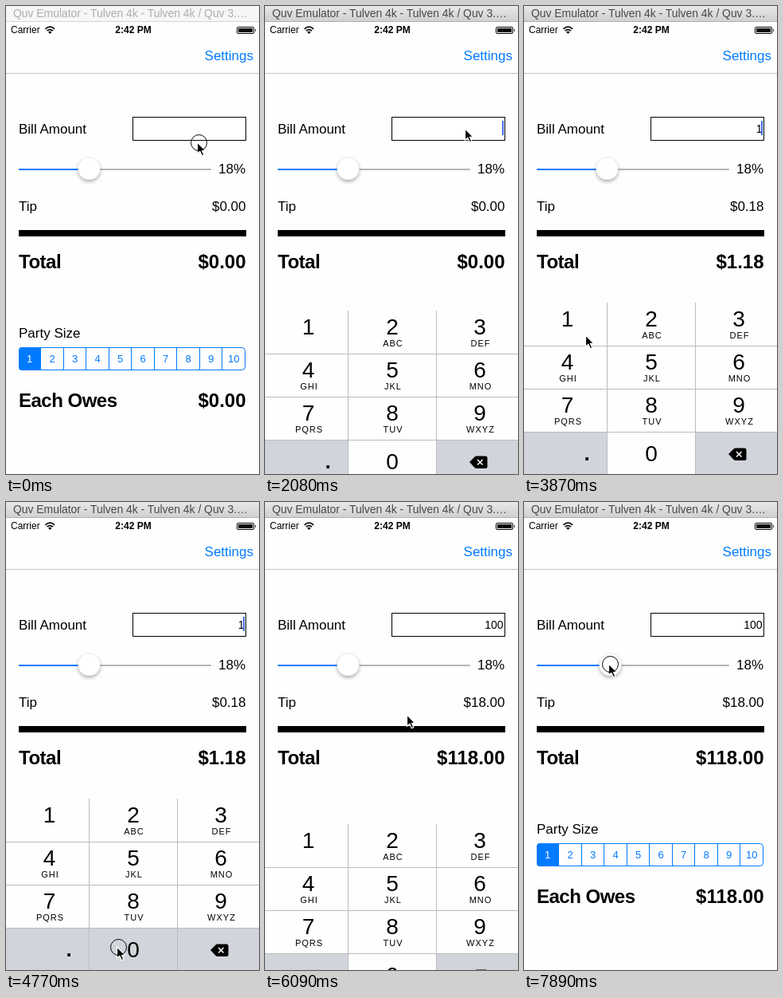
These frames come from a looping animation (318x587 px, 8 s). An HTML page:

```html
<!DOCTYPE html>
<html lang="en">
<head>
<meta charset="utf-8">
<title>Tip calculator</title>
<style>
html, body { margin: 0; width: 100%; height: 100%; overflow: hidden; background: #fff; }
svg { display: block; width: 318px; height: 587px; font: 17px "Liberation Sans", Arial, sans-serif; }
.blue { fill: #007aff; }
.end { text-anchor: end; }
.mid { text-anchor: middle; }
.big { font-size: 24px; font-weight: bold; }
.label { letter-spacing: -.5px; }
.seg { font-size: 13px; }
.digit { font-size: 28px; }
.letters { font-size: 11px; letter-spacing: 1px; }
.line { stroke: #b9bbbe; }
</style>
</head>
<body>
<svg viewBox="0 0 318 587">
  <defs>
    <linearGradient id="chrome" x2="0" y2="1">
      <stop stop-color="#e8e8e8"/><stop offset="1" stop-color="#d0d0d0"/>
    </linearGradient>
    <filter id="shadow" x="-50%" y="-50%" width="200%" height="200%">
      <feDropShadow dx="0" dy="2.5" stdDeviation="2" flood-opacity=".3"/>
    </filter>
  </defs>
  <rect width="318" height="587" fill="#fefefe"/>

  <rect id="titleBar" width="318" height="19"/>
  <path id="titleEdge" d="M0 19.5H318"/>
  <text id="title" x="9" y="14" font-size="13.9">Quv Emulator - Tulven 4k - Tulven 4k / Quv 3.…</text>

  <g font-size="12">
    <text x="6" y="34">Carrier</text>
    <text class="mid" x="160" y="34" font-weight="bold">2:42 PM</text>
  </g>
  <g fill="none" stroke="#000" stroke-width="1.6">
    <path d="M49.5 28.8Q55.3 23.6 61.1 28.8M51.6 31.2Q55.3 28 59 31.2"/>
    <path d="M53 32.6Q55.3 30.8 57.6 32.6L55.3 35Z" fill="#000" stroke="none"/>
  </g>
  <rect x="290.5" y="26.5" width="21" height="8" rx="1.5" fill="none" stroke="#000"/>
  <path d="M292 28H310V33H292ZM313 28.5Q315 30.5 313 32.5Z"/>
  <text class="blue end" x="311" y="68">Settings</text>
  <path d="M0 84.5H318" stroke="#c4c4c4"/>

  <text x="16" y="160">Bill Amount</text>
  <rect x="159.5" y="139.5" width="142" height="29" fill="#fff" stroke="#000"/>
  <text id="bill" class="end" x="299.5" y="159" font-size="14"></text>
  <rect id="caret" x="298" y="144" width="2" height="18" fill="#426bf2"/>

  <rect x="16" y="204" width="242" height="2" rx="1" fill="#b7b7b7"/>
  <rect id="filled" class="blue" x="16" y="204" height="2" rx="1"/>
  <circle id="knob" cy="204" r="14" fill="#fff" stroke="#000" stroke-opacity=".12" stroke-width=".6" filter="url(#shadow)"/>
  <text class="end" x="301" y="210">18%</text>

  <text x="16" y="257">Tip</text>
  <text id="tip" class="end" x="301.5" y="257"></text>
  <rect x="16" y="281" width="286" height="8"/>
  <text class="big label" x="16" y="329">Total</text>
  <text id="total" class="big end" x="301.5" y="329"></text>

  <text x="16" y="416">Party Size</text>
  <g id="party"></g>
  <text class="big label" x="16" y="503">Each Owes</text>
  <text id="each" class="big end" x="301.5" y="503"></text>

  <g id="keyboard"></g>
  <g id="pointer">
    <path d="M0 0V14.2L3.3 11.2 5.8 16.8 8.3 15.7 5.9 10.3H10.2Z" stroke="#fff" stroke-width="1.2"/>
    <circle id="ring" cx="2" cy=".5" r="10" fill="none" stroke="#000"/>
  </g>
</svg>
<script>
const LOOP = 8000, TICK = 148.8;
const KEY_GREY = '#d1d5db';
const $ = id => document.getElementById(id);
const set = (id, attrs) => {
  for (const name in attrs) $(id).setAttribute(name, attrs[name]);
};
const show = (id, on) => set(id, { visibility: on ? 'visible' : 'hidden' });
const within = (n, ...spans) => spans.some(([from, to]) => n >= from && n < to);

function buildParty() {
  const step = 28.5;
  let out = '<path class="blue" d="M20 428H44V457H20Q16 457 16 453V432Q16 428 20 428Z"/>' +
    '<rect x="16.5" y="428.5" width="284" height="28" rx="4" fill="none" stroke="#007aff"/>';
  for (let i = 0; i < 10; i++) {
    const x = 16 + i * step;
    if (i) out += `<path d="M${Math.floor(x) - .5} 428V457" stroke="#007aff"/>`;
    out += `<text class="seg mid" x="${x + 13.7}" y="447" fill="${i ? '#007aff' : '#fff'}">${i + 1}</text>`;
  }
  $('party').innerHTML = out;
}

function buildKeyboard() {
  const letters = ['', 'ABC', 'DEF', 'GHI', 'JKL', 'MNO', 'PQRS', 'TUV', 'WXYZ'];
  const centers = [54.5, 160, 270];
  let out = '<rect width="318" height="216" fill="#fefefe"/>' +
    `<rect y="162" width="318" height="54" fill="${KEY_GREY}"/>` +
    '<rect id="key1" width="104" height="54"/>' +
    '<rect id="key0" x="105" y="162" width="110" height="54"/>' +
    '<path class="line" d="M104.5 0V216M215.5 0V216M0 54.5H318M0 108.5H318M0 162.5H318"/>';
  letters.forEach((text, i) => {
    const x = centers[i % 3], y = Math.floor(i / 3) * 54;
    out += `<text class="digit mid" x="${x}" y="${y + 30}">${i + 1}</text>` +
      `<text class="letters mid" x="${x + 1}" y="${y + 45}">${text}</text>`;
  });
  out += '<text class="digit mid" x="160" y="199">0</text>' +
    '<text class="mid" x="79" y="198" font-size="26" font-weight="bold">.</text>' +
    '<path d="M257 190L263.5 183.5Q264.5 182.5 266 182.5H277Q279.5 182.5 279.5 185V195.5Q279.5 198 277 198H266Q264.5 198 263.5 197Z"/>' +
    '<path d="M267 187L273.5 193.5M273.5 187L267 193.5" stroke="#fff" stroke-width="1.5"/>';
  $('keyboard').innerHTML = out;
}

// Pointer stops: tick, x, y. A stop is held until the next one.
const stops = [
  [0, 240, 171], [3, 244, 164], [4, 249, 155], [5, 253, 148], [6, 252, 151], [7, 251, 154],
  [18, 200, 310], [19, 100, 455], [20, 77, 462], [23, 77, 413],
  [27, 90, 445], [28, 125, 530], [29, 138, 559], [30, 139, 558],
  [37, 150, 470], [38, 172, 310], [39, 178, 267],
  [45, 150, 242], [46, 114, 216], [48, 109, 208], [49, 106, 203]
];

const settle = n => n <= 0 ? 0 : 1 - (1 + 1.9 * n) * Math.exp(-1.9 * n);
const money = value => '$' + value.toFixed(2);

function render(t) {
  const n = Math.floor((t + 12) / TICK);

  const active = n >= 10;
  set('titleBar', { fill: active ? 'url(#chrome)' : '#f6f6f6' });
  set('titleEdge', { stroke: active ? '#b0b0b0' : '#d4d4d4' });
  set('title', { fill: active ? '#484848' : '#adadad' });

  const bill = n < 25 ? '' : n < 33 ? '1' : n < 35 ? '10' : '100';
  const tip = bill * .18, total = bill * 1.18;
  $('bill').textContent = bill;
  $('tip').textContent = money(tip);
  $('total').textContent = $('each').textContent = money(total);
  show('caret', within(n, [11, 17], [20, 23], [25, 30], [31, 40]));

  const knob = n < 53 ? 104.5 : 108.5;
  set('knob', { cx: knob });
  set('filled', { width: knob - 16 });

  const raised = n < 45 ? settle(n - 11.45) - settle(n - 40.64) : 0;
  set('keyboard', { transform: `translate(0 ${Math.round(588 - 216 * raised)})` });
  set('key1', { fill: n === 24 ? KEY_GREY : 'none' });
  set('key0', { fill: within(n, [32, 33], [34, 35]) ? KEY_GREY : '#fefefe' });

  const [, x, y] = stops.filter(stop => stop[0] <= n).pop();
  set('pointer', { transform: `translate(${x + .5} ${y})` });
  show('ring', [0, 10, 24, 32, 34, 39, 53].includes(n));
}

buildParty();
buildKeyboard();
const start = performance.now();
function frame() {
  render((performance.now() - start) % LOOP);
  requestAnimationFrame(frame);
}
frame();
</script>
</body>
</html>
```
